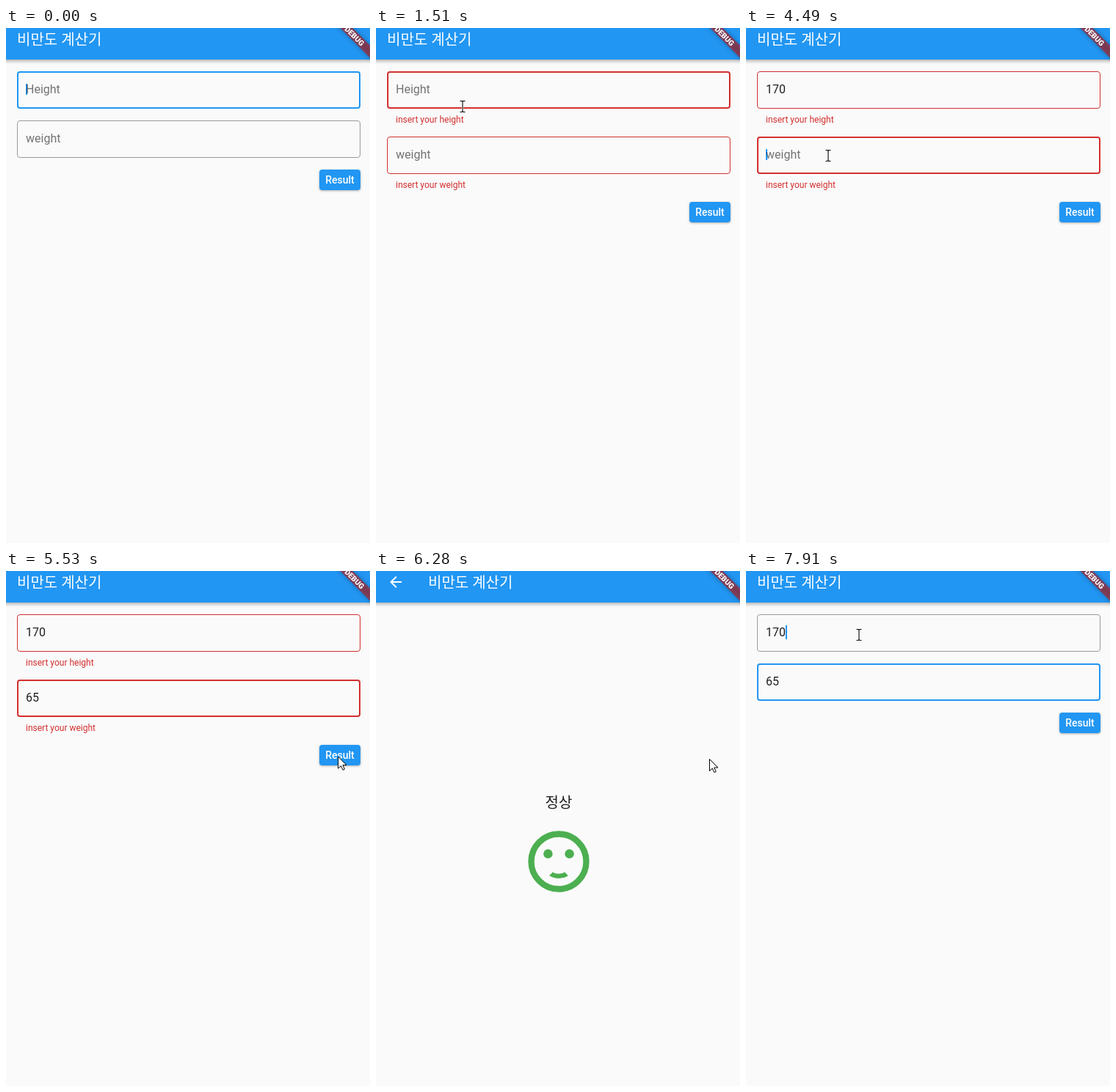
Recreate the animation shown at these times as an HTML page. Size 496 by 702 pixels, loop 8000 ms.

```html
<!DOCTYPE html>
<html lang="ko">
<head>
<meta charset="utf-8">
<style>
  html, body { margin: 0; width: 100%; height: 100%; overflow: hidden; background: #fafafa; }
  svg { display: block; }
  text { font: 16px Roboto, "Noto Sans CJK KR", "Noto Sans CJK", sans-serif; white-space: pre; }
  .title { font-size: 20px; fill: #fff; }
  .hint { fill: #000; fill-opacity: .54; }
  .value { fill: #000; fill-opacity: .87; }
  .error { font-size: 12px; fill: #d32f2f; }
  .bar { fill: #2196f3; filter: drop-shadow(0 2px 2.5px rgba(0, 0, 0, .32)); }
  .caret { fill: #2196f3; }
</style>
</head>
<body>
<svg width="496" height="702" viewBox="0 0 496 702">
  <rect width="496" height="702" fill="#fafafa"/>

  <g id="form">
    <rect class="bar" x="-10" y="-13" width="520" height="56"/>
    <text class="title" x="15" y="23">비만도 계산기</text>
    <g id="button">
      <rect x="427" y="193" width="56" height="28" rx="4" fill="#2196f3"
        style="filter: drop-shadow(0 1.5px 1.5px rgba(0, 0, 0, .3))"/>
      <rect id="press" x="427" y="193" width="56" height="28" rx="4" fill="#fff"/>
      <text x="455" y="212" text-anchor="middle" fill="#fff" style="font-size: 14px; font-weight: 500">Result</text>
    </g>
  </g>

  <g id="result">
    <rect x="-10" y="-13" width="520" height="740" fill="#fafafa"/>
    <rect class="bar" x="-10" y="-13" width="520" height="56"/>
    <clipPath id="barClip"><rect x="-10" y="-13" width="520" height="56"/></clipPath>
    <circle id="ripple" cx="27" cy="15" r="35" fill="#fff" clip-path="url(#barClip)"/>
    <path transform="translate(15 3)" fill="#fff"
      d="M20 11H7.83l5.59-5.59L12 4l-8 8 8 8 1.41-1.41L7.83 13H20z"/>
    <text class="title" x="71" y="23">비만도 계산기</text>
    <text class="value" x="249" y="323" text-anchor="middle" style="font-size: 20px">정상</text>
    <g transform="translate(249 396) scale(4.1667) translate(-12 -12)" fill="#4caf50">
      <circle cx="12" cy="12" r="9" fill="none" stroke="#4caf50" stroke-width="2"/>
      <circle cx="8.5" cy="9.5" r="1.5"/>
      <circle cx="15.5" cy="9.5" r="1.5"/>
      <path d="M10.03 15.47C10.61 15.81 11.27 16 12 16s1.39-.19 1.97-.53l1.12 1.12c-.89.57-1.94.91-3.09.91s-2.2-.34-3.09-.91z"/>
    </g>
  </g>

  <g transform="translate(499 -13) rotate(45)">
    <rect x="-40" y="28" width="80" height="12" fill="#b71c1ca0"
      style="filter: drop-shadow(0 0 3px rgba(0, 0, 0, .5))"/>
    <text y="37.7" text-anchor="middle" fill="#fff" style="font-size: 10.2px; font-weight: 900">DEBUG</text>
  </g>

  <g id="pointer">
    <path id="arrow" d="M.5.5V16.5L4.3 13 6.9 18.6 9.3 17.5 6.8 12H12z" fill="#fff" stroke="#000"/>
    <g id="beam" fill="none">
      <path id="beamShape" d="M-3.5-7.5H-1L0-6.5 1-7.5H3.5M0-6.5V6.5M-3.5 7.5H-1L0 6.5 1 7.5H3.5"
        stroke="#fff" stroke-width="2.4" stroke-opacity=".7"/>
      <use href="#beamShape" style="stroke: #000"/>
      <path d="M-3.5-7.5H-1L0-6.5 1-7.5H3.5M0-6.5V6.5M-3.5 7.5H-1L0 6.5 1 7.5H3.5" stroke="#000" stroke-width="1.1"/>
    </g>
  </g>
</svg>

<script>
const LOOP = 8000;
const GRAY = [155, 155, 155], BLUE = [33, 150, 243], RED = [211, 47, 47];

const $ = id => document.getElementById(id);
const set = (el, attrs) => { for (const k in attrs) el.setAttribute(k, attrs[k]); };
const ramp = (t, start, length) => Math.min(1, Math.max(0, (t - start) / length));
const mix = (a, b, k) => a.map((v, i) => v + (b[i] - v) * k);
const smooth = s => s * s * (3 - 2 * s);

// Cubic easing with control points (x1, 0) and (x2, 1)
const ease = (x1, x2) => x => {
  let low = 0, high = 1;
  for (let i = 0; i < 24; i++) {
    const s = (low + high) / 2, r = 1 - s;
    if (3 * r * r * s * x1 + 3 * r * s * s * x2 + s * s * s < x) low = s; else high = s;
  }
  return smooth(low);
};
const easeIn = ease(.42, 1), fastOutSlowIn = ease(.4, .2);

function add(parent, tag, attrs, content = '') {
  const el = document.createElementNS('http://www.w3.org/2000/svg', tag);
  set(el, attrs);
  el.textContent = content;
  return parent.appendChild(el);
}

function makeField(hint, error, typing) {
  const group = add($('form'), 'g', {});
  return {
    group, typing,
    border: add(group, 'rect', { fill: 'none' }),
    caret: add(group, 'rect', { class: 'caret', width: 2 }),
    hint: add(group, 'text', { class: 'hint', x: 27, y: 30 }, hint),
    value: add(group, 'text', { class: 'value', x: 27, y: 30 }),
    error: add(group, 'text', { class: 'error', x: 27 }, error)
  };
}

// typing: [time, text]
const height = makeField('Height', 'insert your height', [[2450, '1'], [3380, '17'], [3660, '170']]);
const weight = makeField('weight', 'insert your weight', [[4800, '6'], [5000, '65']]);

const caretOn = [[0, 420], [920, 1420], [1920, 2990], [3380, 4160], [4300, 5500], [7185, 7700], [7910, LOOP]];

// time, x, y
const pointerPath = [
  [70, 430, 704], [760, 456, 212], [980, 456, 212], [1510, 118, 107], [1650, 114, 98],
  [1790, 114, 98], [1920, 109.5, 95], [3640, 109.5, 95], [4250, 112, 174], [4680, 112, 174],
  [5300, 440, 231], [5600, 454, 256], [6450, 454, 256], [7080, 37, 22], [7250, 37, 22], [7740, 154, 87]
];

function pointerAt(t) {
  const next = pointerPath.findIndex(p => p[0] > t);
  if (next < 0) return pointerPath[pointerPath.length - 1];
  if (next === 0) return pointerPath[0];
  const a = pointerPath[next - 1], b = pointerPath[next];
  return mix(a, b, smooth(ramp(t, a[0], b[0] - a[0])));
}

function drawField(field, t, top, focus, error, hasCaret) {
  const typed = field.typing.filter(k => t >= k[0]).pop();
  const value = typed ? typed[1] : '';
  const stroke = 1 + focus;
  const color = mix(mix(GRAY, BLUE, focus), RED, error).map(Math.round);
  set(field.group, { transform: `translate(0 ${top})` });
  set(field.border, {
    x: 15 + stroke / 2, y: stroke / 2, width: 468 - stroke, height: 51 - stroke, rx: 4 - stroke / 2,
    stroke: `rgb(${color})`, 'stroke-width': stroke
  });
  field.value.textContent = value;
  set(field.hint, { opacity: 1 - ramp(t, field.typing[0][0] - 20, 150) });
  set(field.error, { opacity: error, y: 70 - 3.5 * (1 - error) });
  set(field.caret, {
    x: 27 + 8.98 * value.length, y: value ? 15 : 17, height: value ? 19 : 15, opacity: hasCaret ? 1 : 0
  });
}

function draw(t) {
  const error = ramp(t, 860, 167) - ramp(t, 5870, 167);
  const gap = t >= 880 && t < 6000 ? 22 : 0;
  const moved = ramp(t, 4290, 167);
  const weightFocus = t < 6300 ? moved : ramp(t, 7240, 167);
  const blink = caretOn.some(([from, to]) => t >= from && t < to);
  const inWeight = t >= 4300 && t < 7910;
  drawField(height, t, 59, 1 - moved, error, blink && !inWeight);
  drawField(weight, t, 126 + gap, weightFocus, error, blink && inWeight);

  set($('button'), { transform: `translate(0 ${2 * gap})` });
  const press = ramp(t, 800, 60) - ramp(t, 950, 150) + ramp(t, 5800, 60) - ramp(t, 6300, 100);
  set($('press'), { opacity: .25 * press });

  const page = ramp(t, 5936, 300) - ramp(t, 7185, 300);
  set($('result'), {
    opacity: page > 0 ? easeIn(page) : 0,
    transform: `translate(0 ${180 * (1 - fastOutSlowIn(page))})`
  });
  set($('ripple'), { opacity: .16 * ramp(t, 7000, 100) });

  const [, x, y] = pointerAt(t);
  const inside = top => y >= top && y <= top + 51;
  const overField = (t < 5936 || t > 7300) && x > 15 && x < 483 && (inside(59) || inside(126 + gap));
  set($('pointer'), { transform: `translate(${x} ${y})` });
  set($('arrow'), { visibility: overField ? 'hidden' : 'visible' });
  set($('beam'), { visibility: overField ? 'visible' : 'hidden' });
}

function tick() {
  draw(performance.now() % LOOP);
  requestAnimationFrame(tick);
}
tick();
</script>
</body>
</html>
```
